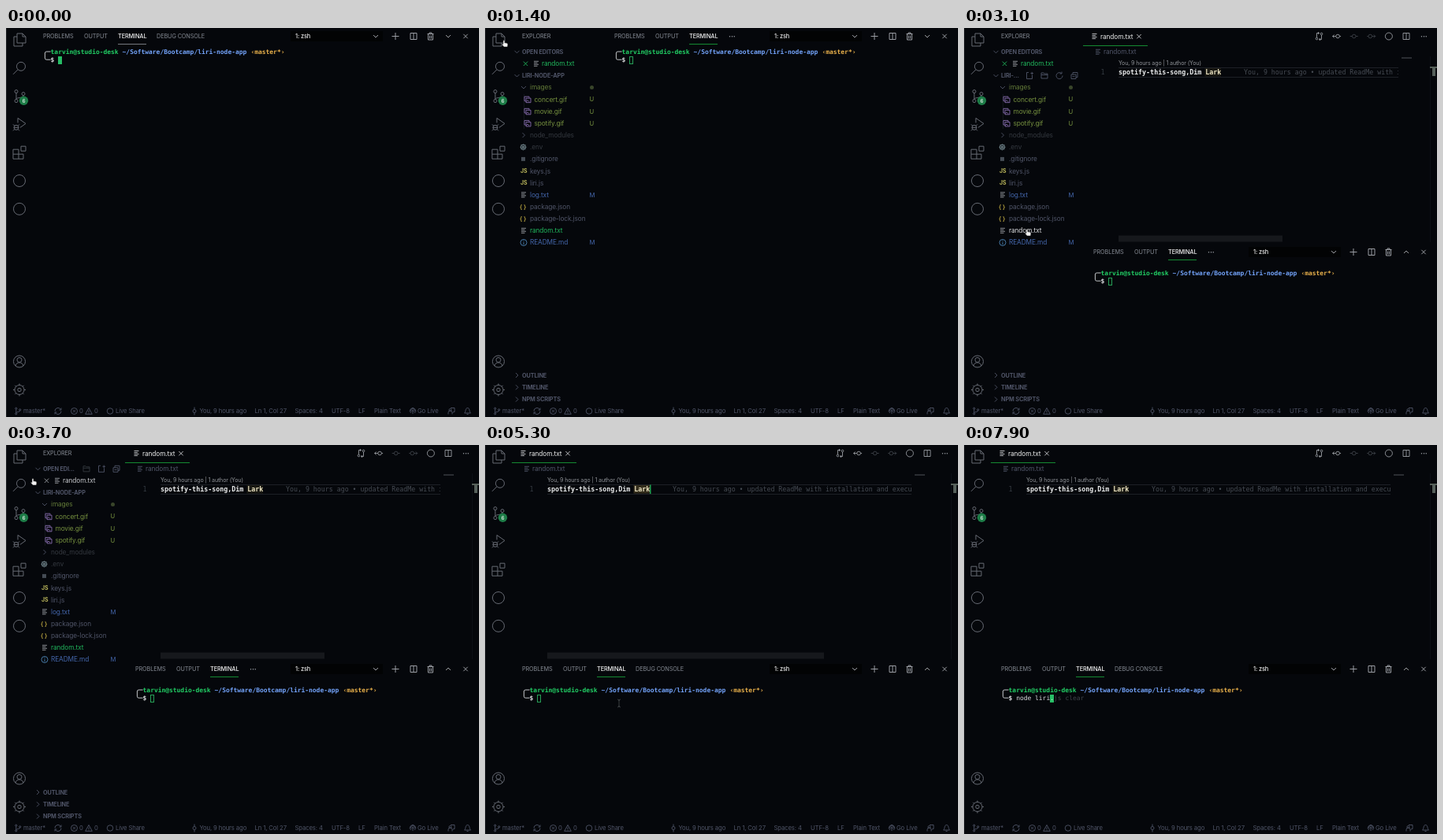
An HTML page with a canvas that plays this animation: 600 by 494 pixels, repeating every 8 s.

```html
<!DOCTYPE html>
<html lang="en">
<head>
<meta charset="utf-8">
<title>Editor and terminal</title>
<style>
html, body { margin: 0; height: 100%; overflow: hidden; background: #05070b; }
canvas { display: block; }
</style>
</head>
<body>
<canvas width="600" height="494"></canvas>
<script>
const ctx = document.querySelector('canvas').getContext('2d');
const SANS = 'Inter, sans-serif', MONO = '"DejaVu Sans Mono", monospace';
const LOOP = 8000, SIDE = 117, CELL = 4.79;
const DIM = '#505568', ICON = '#666a73', ACTION = '#9a9da3', GREEN = '#20b55c', BLUE = '#4466ab', OLIVE = '#76913f', FADED = '#34383f';

// y is the middle of the capitals
function text(s, x, y, size, color, weight = 400, family = SANS) {
  ctx.font = `${weight} ${size}px ${family}`;
  ctx.letterSpacing = family === SANS ? '-0.12px' : '0px';
  ctx.fillStyle = color;
  ctx.fillText(s, x, y + size * 0.36);
}
const mono = (s, x, y, size, color, weight) => text(s, x, y, size, color, weight, MONO);
function rect(x, y, w, h, color) {
  ctx.fillStyle = color;
  ctx.fillRect(x, y, w, h);
}
function icon(d, x, y, color, width = 1, scale = 1) {
  ctx.save();
  ctx.translate(x, y);
  ctx.scale(scale, scale);
  ctx.lineWidth = width / scale;
  ctx.strokeStyle = color;
  ctx.stroke(new Path2D(d));
  ctx.restore();
}
const ring = (x, y, r) => `M${x + r} ${y}a${r} ${r} 0 1 1 ${-2 * r} 0a${r} ${r} 0 1 1 ${2 * r} 0`;
const spokes = (n, from, to) => Array.from({ length: n }, (_, i) => {
  const a = i * 2 * Math.PI / n, c = Math.cos(a), s = Math.sin(a);
  return `M${c * from} ${s * from}L${c * to} ${s * to}`;
}).join('');

const shapes = {
  files: 'M-3-8H4L8-4V4H-3ZM4-8V-4H8M-3-4H-7V8H4V4',
  search: ring(2, -2, 5.5) + 'M-2 2L-8 8',
  branch: ring(-4, -6, 2) + ring(-4, 6, 2) + ring(5, -3, 2) + 'M-4-4V4M5-1C5 3-4 1-4 4',
  debug: 'M-2-2V-8L8-1L1 4' + ring(-4, 4, 3) + 'M-7 4H-1M-8 0L-6 2M0 0L-2 2M-8 8L-6 6M0 8L-2 6',
  blocks: 'M-8-4H-1V8H-8ZM-8 2H5V8H-1M2-8H8V-2H2Z',
  circle: ring(0, 0, 7.5),
  person: ring(0, 0, 7.5) + ring(0, -2, 3) + 'M-5 5.5C-4 0 4 0 5 5.5',
  gear: ring(0, 0, 6) + ring(0, 0, 2.2) + spokes(8, 6, 8),
  plus: 'M-4.5 0H4.5M0-4.5V4.5',
  close: 'M-2.7-2.7L2.7 2.7M2.7-2.7L-2.7 2.7',
  split: 'M-4-4H4V4H-4ZM0-4V4',
  trash: 'M-4-3H4M-1.5-3V-4.5H1.5V-3M-3-3V4.5H3V-3M-1-1V3M1-1V3',
  down: 'M-3-1.5L0 1.5L3-1.5',
  up: 'M-3 1.5L0-1.5L3 1.5',
  right: 'M-1.5-3L1.5 0L-1.5 3',
  lines: 'M-3-3H3M-3-1H1.5M-3 1H3M-3 3H1.5',
  compare: ring(-3, 3, 1.3) + ring(3, -3, 1.3) + 'M-3 1.5V-4H0M3-1.5V4H0M-1.5-5.5L0-4L-1.5-2.5M1.5 2.5L0 4L1.5 5.5',
  commit: ring(0, 0, 2.3) + 'M-5 0H-2.3M2.3 0H5',
  back: ring(1.5, 0, 2.3) + 'M-.8 0H-5M-3-2L-5 0L-3 2M3.8 0H5.5',
  forward: ring(-1.5, 0, 2.3) + 'M.8 0H5M3-2L5 0L3 2M-3.8 0H-5.5',
  sync: 'M-4 0A4 4 0 0 1 3.5-2M4 0A4 4 0 0 1-3.5 2M4-4V-1.5H1.5M-4 4V1.5H-1.5',
  error: ring(0, 0, 4) + 'M-1.5-1.5L1.5 1.5M1.5-1.5L-1.5 1.5',
  warning: 'M0-4L4.3 3.8H-4.3ZM0-1V1.5M0 2V3',
  pin: ring(0, 0, 2) + 'M0-5V-2M0 2V5',
  tower: ring(0, -1, 1) + 'M0 0V4.5M-2 1A3 3 0 1 1 2 1M-3 3A4.5 4.5 0 1 1 3 3',
  feedback: 'M-4 4V2A2 2 0 0 1 1 2V4M-1-4H4V1H3L1.5 2' + ring(-1.5, -1.5, 1.5),
  bell: 'M-4 2.5C-2 1-3-4 0-4C3-4 2 1 4 2.5ZM-1 4H1',
  picture: 'M-4-3.5H2V-2M-4-3.5V2H-2.5M-2-1.5H4V4H-2ZM-2 3L0 1L2 3',
  info: ring(0, 0, 4) + 'M0-.5V2.5M0-2.5V-1.5',
  newFile: 'M-1-4H-3.5V4H3.5V-1M1.5-3H5M3.2-4.7V-1.3',
  newFolder: 'M-4-3.5H-1L0-2.5H4V3.5H-4ZM-4-1H4',
  refresh: 'M2.5-3A4 4 0 1 0 4 0M3-5V-2.5H.5',
  stack: 'M-4-1.5H2V4H-4ZM-2-1.5V-4H4V2H2M-2.5 1.2H.5'
};
const sign = (name, ...rest) => icon(shapes[name], ...rest);

// time, x, y of the pointer's tip
const path = [
  [100, 119, 37], [200, 317, 178], [300, 291, 158], [400, 291, 158], [500, 180, 105], [600, 41, 48], [800, 41, 48],
  [1000, 22, 17], [1400, 24, 16], [1700, 26, 20], [1900, 70, 120], [2200, 88, 215], [2500, 81, 249.5],
  [2700, 80, 256], [3100, 80, 256], [3500, 40, 62], [3700, 34, 43], [3900, 22, 24], [4100, 15, 8],
  [4500, 15, 8], [4600, 75, 110], [4700, 140, 218], [4900, 150, 245], [5300, 170, 328], [5900, 170, 328]
];
function pointerAt(t) {
  const i = path.findIndex(p => p[0] > t);
  if (i < 1) return null;
  const [a, ax, ay] = path[i - 1], [b, bx, by] = path[i], k = (t - a) / (b - a);
  return { x: ax + (bx - ax) * k, y: ay + (by - ay) * k };
}

const command = 'node liri.js clear';
const keyTimes = [6500, 6700, 6800, 6900, 7100, 7300, 7400, 7600, 7800];

// name, icon, colour, status
const tree = [
  ['images', 'down', '#627a38', '●'],
  ['concert.gif', 'picture', OLIVE, 'U'], ['movie.gif', 'picture', OLIVE, 'U'], ['spotify.gif', 'picture', OLIVE, 'U'],
  ['node_modules', 'right', FADED], ['.env', 'gear', FADED], ['.gitignore', 'square', DIM],
  ['keys.js', 'JS', DIM], ['liri.js', 'JS', DIM], ['log.txt', 'lines', BLUE, 'M'],
  ['package.json', '{ }', DIM], ['package-lock.json', '{ }', DIM],
  ['random.txt', 'lines', GREEN], ['README.md', 'info', BLUE, 'M']
];

function activityBar() {
  rect(0, 0, 1, 494, '#24262a');
  ['files', 'search', 'branch', 'debug', 'blocks', 'circle', 'circle'].forEach((name, i) => sign(name, 17, 15 + i * 35.8, ICON));
  sign('person', 17, 423.5, ICON);
  sign('gear', 17, 459.5, ICON);
  ctx.fillStyle = '#1d7c47';
  ctx.fill(new Path2D(ring(22.5, 92.3, 5.7)));
  text('6', 20.7, 92.4, 6, '#e4efe8', 600);
}

function statusBar() {
  const y = 486.5;
  [['branch', 15, .55], ['sync', 66, 1], ['error', 86.5, 1], ['warning', 105, 1], ['circle', 132, .5], ['pin', 239, 1],
    ['tower', 516, .8], ['feedback', 565, 1], ['bell', 585.5, 1]].forEach(([n, x, s]) => sign(n, x, y, DIM, .9, s));
  [['master*', 22], ['0', 93], ['0', 112], ['Live Share', 139], ['You, 9 hours ago', 245.5], ['Ln 1, Col 27', 315.5], ['Spaces: 4', 366.5],
    ['UTF-8', 413], ['LF', 447], ['Plain Text', 467], ['Go Live', 522]].forEach(([s, x]) => text(s, x, y, 7.7, DIM));
}

function sideBar(mouse) {
  const inside = mouse && mouse.x >= 33 && mouse.x < 151;
  const overOpen = inside && mouse.y > 23 && mouse.y < 53;
  const overTree = inside && mouse.y >= 53 && mouse.y < 433;
  const header = (s, y, arrow) => {
    sign(arrow, 40.5, y, DIM, .9);
    text(s, 47, y, 7.3, DIM, 700);
  };
  text('EXPLORER', 47, 10.5, 7.3, '#888d96');
  header(overOpen ? 'OPEN EDI...' : 'OPEN EDITORS', 30.3, 'down');
  header(overTree ? 'LIRI-...' : 'LIRI-NODE-APP', 60.5, 'down');
  if (overOpen) ['newFolder', 'newFile', 'stack'].forEach((n, i) => sign(n, 102 + i * 19, 30.3, i ? DIM : FADED, .9));
  if (overTree) ['newFile', 'newFolder', 'refresh', 'stack'].forEach((n, i) => sign(n, 83 + i * 19, 60.5, DIM, .9));
  const overFile = overOpen && mouse.y > 37.5;
  sign('close', 51.5, 45.3, overFile ? ACTION : GREEN, .9);
  sign('lines', 65, 45.3, ACTION, .9);
  text('random.txt', 72, 45.3, 8.3, overFile ? '#c4c6ca' : GREEN);

  const lit = overTree ? Math.round((mouse.y - 75.5) / 15.15) : -1;
  rect(49, 84, .7, 44, '#1b1f25');
  tree.forEach(([name, kind, color, status], i) => {
    const y = 75.5 + i * 15.15, nested = kind === 'picture';
    if (kind === 'JS') text('JS', 45, y, 7, '#bdb95c', 700);
    else if (kind === '{ }') text('{ }', 44, y, 7.5, '#b5a13f', 600);
    else if (kind === 'square') rect(46, y - 2.5, 5, 5, '#454c55');
    else if (nested) sign('picture', 54, y, '#8a6fb0', .9);
    else if (kind === 'gear') sign('gear', 48.5, y, '#6d8087', 1.2, .5);
    else sign(kind, 49, y, kind === 'lines' ? ACTION : kind === 'info' ? '#4f86b8' : DIM, .9);
    text(name, nested ? 62.5 : 57, y, 8.3, i === lit ? '#dcdde0' : color);
    if (status === '●') {
      ctx.fillStyle = '#39452a';
      ctx.fill(new Path2D(ring(135.5, y, 2.5)));
    } else if (status) text(status, 132.5, y, 7.7, color);
  });
  ['OUTLINE', 'TIMELINE', 'NPM SCRIPTS'].forEach((s, i) => header(s, 441 + i * 15.3, 'right'));
}

function editor(dx, focused, caret, scrollbar) {
  const edge = dx ? 551 : 541;
  sign('lines', 48.5 + dx, 10.5, '#c8cacd', .9);
  text('random.txt', 56 + dx, 10.7, 8.3, '#eceded');
  sign('close', 105 + dx, 10.7, '#c8cacd', .9);
  rect(34 + dx, 22, 82, 1, '#148a32');
  ['compare', 'back', 'commit', 'forward', 'circle', 'split'].forEach((n, i) =>
    sign(n, 450.5 + i * 22.1, 10.5, i === 2 || i === 3 ? '#3d4148' : ACTION, .9, n === 'circle' ? .6 : 1));
  text('···', 579, 10.5, 9, ACTION, 700);
  sign('lines', 53 + dx, 30.3, DIM, .9);
  text('random.txt', 60 + dx, 30.3, 8.3, DIM);
  text('You, 9 hours ago | 1 author (You)', 79 + dx, 44.4, 7.05, '#8f9297');

  rect(79 + dx, 50, edge - 79 - dx, .8, '#24272d');
  rect(79 + dx, 62, edge - 79 - dx, .8, '#24272d');
  rect(188.5 + dx, 51, 20.5, 10.5, focused ? '#332d1c' : '#191812');
  mono('1', 56.5 + dx, 56.3, 8.33, '#353a42');
  mono('spotify-this-song,Dim ', 79 + dx, 56.3, 8.33, '#eceded', 700);
  mono('Lark', 79 + dx + 22 * 5.015, 56.3, 8.33, '#eee6c4', 700);
  ctx.save();
  ctx.beginPath();
  ctx.rect(0, 40, edge, 30);
  ctx.clip();
  mono('You, 9 hours ago • updated ReadMe with installation and execution', 238 + dx, 56.3, 8.27, '#464b53');
  ctx.restore();
  if (caret) rect(209.2 + dx, 50.5, 1.2, 11.5, '#27c763');

  rect(edge + 4, 37.5, 13, 1, '#50545a');
  rect(591, 36, .7, 236, '#11141a');
  rect(591, 49, 9, 2, '#566059');
  rect(594, 50, 4, 11, '#56605b');
  ctx.globalAlpha = scrollbar;
  rect(79 + dx, 263.5, dx ? 208 : 351, 8, '#16181c');
  ctx.globalAlpha = 1;
}

function panel(dx, split, focused, first, typed) {
  const y = split ? 284.5 : 10.5;
  [['PROBLEMS', 47], ['OUTPUT', 99], ['TERMINAL', 142]].forEach(([s, x]) => {
    const active = s === 'TERMINAL';
    text(s, x + dx, y, 7.3, active ? '#f2f2f2' : '#858a93', active ? 500 : 400);
  });
  if (dx) text('···', 309, y, 9, ACTION, 700);
  else text('DEBUG CONSOLE', 191, y, 7.3, '#858a93');
  rect(142 + dx, y + 9.5, 36, 1, first ? '#75797f' : '#148a32');
  rect(361, y - 6.5, 117, 13, '#020304');
  text('1: zsh', 367, y, 7.4, '#f0f0f0', 500);
  sign('down', 469, y, ACTION);
  [['plus', 494], ['split', 517], ['trash', 538.5], [split ? 'up' : 'down', 561], ['close', 583]].forEach(([n, x]) => sign(n, x, y, ACTION));

  const row = split ? 311 : 30, line = row + 10.2, at = col => 47 + dx + col * CELL;
  icon('M7.2 0H2Q0 0 0 2V8.2Q0 10.2 2 10.2H7.2', 49.4 + dx, row, '#c3c5c8');
  [['tarvin@studio-desk', 2, '#22cf65'], ['~/Software/Bootcamp/liri-node-app', 21, '#73a3fa'], ['‹master*›', 55, '#e8b04b']]
    .forEach(([s, col, color]) => mono(s, at(col), row, 7.95, color, 700));
  mono('$', at(2), line, 7.95, '#dcdde0', 700);
  const x = at(4 + typed), left = Math.round(x), top = Math.round(line - 4.7);
  if (typed) {
    mono(command.slice(0, typed), at(4), line, 7.95, '#dcdde0');
    mono(command.slice(typed), x, line, 7.95, '#41454b');
  }
  if (focused) {
    rect(left, top, 5, 10, '#27bd65');
    if (typed) mono(command[typed], x, line, 7.95, '#e0f2e6');
  } else {
    ctx.strokeStyle = '#27a058';
    ctx.lineWidth = 1;
    ctx.strokeRect(left + .5, top + .5, 4, 9);
  }
}

function pointer({ x, y }, hand) {
  if (!hand) return icon('M-2-5Q0-5 0-3Q0-5 2-5M0-3V3M-2 5Q0 5 0 3Q0 5 2 5', x, y, 'rgba(190,195,200,.35)', .8);
  const d = 'M-1 0Q0-1 1 0V3Q2 2.5 3 3Q5 3 5 5L4.5 8H0L-2.5 5Q-2.5 3.5-1 4.5Z';
  ctx.save();
  ctx.translate(x, y);
  ctx.fillStyle = '#f2f2f2';
  ctx.fill(new Path2D(d));
  ctx.restore();
  icon(d, x, y, '#111', .5);
}

function draw(now) {
  const t = Math.floor(now % LOOP / 100) * 100;
  const sidebar = t >= 1200 && t < 4000, split = t >= 2800;
  const dx = sidebar ? SIDE : 0, mouse = pointerAt(t);
  const editing = t >= 4000 && t < 5500;
  const caret = editing && (t - 4100) % 1000 < 500;
  const scrollbar = Math.max(0, Math.min(1, (5800 - t) / 400));
  rect(0, 0, 600, 494, '#05070b');
  activityBar();
  statusBar();
  if (sidebar) sideBar(mouse);
  if (split) editor(dx, editing, caret, scrollbar);
  panel(dx, split, t < 1200 || t >= 5500, t < 1200, keyTimes.filter(k => k <= t).length);
  if (mouse) pointer(mouse, mouse.x < 34 + dx);
  requestAnimationFrame(draw);
}
requestAnimationFrame(draw);
</script>
</body>
</html>
```
